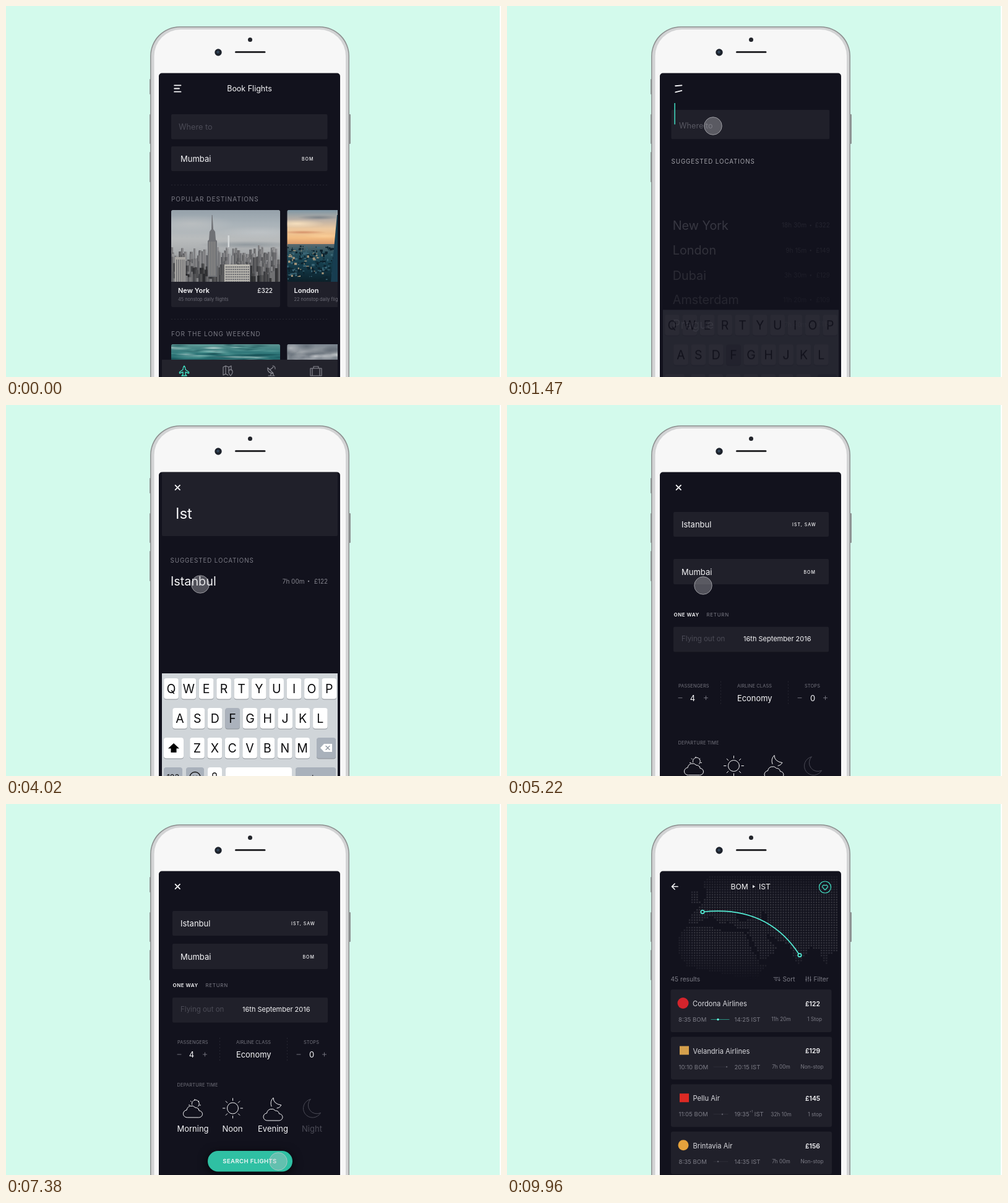
Write an HTML page with a canvas that moves like this. It is 800 by 600 pixels and loops after 9.99 s.

```html
<!DOCTYPE html>
<html lang="en">
<head>
<meta charset="utf-8">
<title>Flight booking</title>
<style>
html, body { margin: 0; width: 100%; height: 100%; overflow: hidden; background: #d3faec; }
canvas { display: block; width: 100%; height: 100%; }
</style>
</head>
<body>
<canvas id="stage" width="800" height="600"></canvas>
<script>
let ctx = document.getElementById('stage').getContext('2d');
const layer = document.createElement('canvas');
layer.width = 800;
layer.height = 600;
const layerCtx = layer.getContext('2d');

const LOOP = 9990;
const BG = '#12121d', FIELD = '#20202a', TEAL = '#42e0c4', WHITE = '#f6f6f8', GREY = '#7c7c86', DIM = '#4b4b56';
let t = 0;

const seg = (a, b) => Math.min(1, Math.max(0, (t - a) / (b - a)));
const inOut = p => p < .5 ? 4 * p ** 3 : 1 - (2 - 2 * p) ** 3 / 2;
const out = p => 1 - (1 - p) ** 3;
const mix = (a, b, p) => a + (b - a) * p;

function fade(alpha, draw, dx = 0, dy = 0) {
  if (alpha <= 0) return;
  ctx.save();
  ctx.globalAlpha *= alpha;
  ctx.translate(dx, dy);
  draw();
  ctx.restore();
}

// Fades overlapping shapes as one picture
function fadeGroup(alpha, draw, dy) {
  if (alpha <= 0) return;
  const main = ctx;
  ctx = layerCtx;
  ctx.clearRect(0, 0, 800, 600);
  draw();
  ctx = main;
  fade(alpha, () => ctx.drawImage(layer, 0, 0), 0, dy);
}

function text(s, x, y, size, color = WHITE, { weight = 400, gap = 0, align = 'left' } = {}) {
  ctx.font = `${weight} ${size}px Inter, sans-serif`;
  ctx.letterSpacing = gap + 'px';
  ctx.textAlign = align;
  ctx.fillStyle = color;
  ctx.fillText(s, x, y + size * .36);
}

function box(x, y, x2, y2, color, r = 2) {
  ctx.fillStyle = color;
  ctx.beginPath();
  ctx.roundRect(x, y, x2 - x, y2 - y, r);
  ctx.fill();
}

function disc(x, y, r, color) {
  ctx.fillStyle = color;
  ctx.beginPath();
  ctx.arc(x, y, r, 0, 7);
  ctx.fill();
}

function stroke(path, color, width = 1, x = 0, y = 0) {
  ctx.save();
  ctx.translate(x, y);
  ctx.strokeStyle = color;
  ctx.lineWidth = width;
  ctx.lineCap = ctx.lineJoin = 'round';
  ctx.stroke(new Path2D(path));
  ctx.restore();
}

function dashes(x1, y1, x2, y2) {
  ctx.save();
  ctx.setLineDash([2, 3]);
  ctx.strokeStyle = '#272731';
  ctx.beginPath();
  ctx.moveTo(x1, y1);
  ctx.lineTo(x2, y2);
  ctx.stroke();
  ctx.restore();
}

function gradient(x, y, x2, y2, colors) {
  const g = ctx.createLinearGradient(0, y, 0, y2);
  colors.forEach((c, i) => g.addColorStop(i / (colors.length - 1), c));
  box(x, y, x2, y2, g);
}

// Soft elliptical blob; rgb is "r,g,b"
function glow(x, y, rx, ry, rgb, alpha) {
  ctx.save();
  ctx.translate(x, y);
  ctx.scale(rx, ry);
  const g = ctx.createRadialGradient(0, 0, 0, 0, 0, 1);
  g.addColorStop(0, `rgba(${rgb},${alpha})`);
  g.addColorStop(1, `rgba(${rgb},0)`);
  disc(0, 0, 1, g);
  ctx.restore();
}

function random(seed) {
  return () => (seed = (seed * 16807) % 2147483647) / 2147483647;
}

function clipped(x, y, x2, y2, draw, r = 2) {
  ctx.save();
  ctx.beginPath();
  ctx.roundRect(x, y, x2 - x, y2 - y, r);
  ctx.clip();
  draw();
  ctx.restore();
}

function phone() {
  box(0, 0, 800, 600, '#fff', 0);
  box(0, 0, 798, 600, '#d3faec', 0);
  [[232, 118, 143], [232, 175, 223], [232, 236, 285], [553, 175, 223]]
    .forEach(([x, y, y2]) => box(x, y, x + 4, y2, '#8e9594', 1));
  box(233, 33, 555, 720, '#8d9090', 48);
  box(234.5, 34.5, 553.5, 720, '#d2d3d4', 47);
  box(239.5, 38, 549, 720, '#f7f7f7', 43);
  disc(394.5, 54.5, 3.5, '#23252b');
  disc(343, 75, 5.7, '#1d222b');
  disc(342.5, 74.5, 2.2, '#33475c');
  box(370, 73, 419.5, 76, '#2a2a2d', 1.5);
  box(247, 108.5, 540, 720, BG, 5);
}

function skyline() {
  gradient(267, 330, 443, 446, ['#95a1aa', '#aab3b9', '#b9bcbd', '#a8abad', '#85878a', '#57585b']);
  glow(300, 352, 70, 14, '205,203,200', .45);
  glow(410, 366, 70, 10, '200,204,207', .5);
  glow(390, 386, 80, 6, '118,130,139', .55);
  const rnd = random(11);
  for (let i = 0; i < 260; i++) {
    const depth = i / 260;
    const x = 264 + rnd() * 180, y = 386 + depth * 48 + rnd() * 8, w = 2.5 + depth * 5 * rnd() + rnd() * 2;
    const v = Math.round(142 - depth * 62 + (rnd() - .5) * (40 + depth * 70));
    box(x, y, x + w, 446, `rgb(${v},${v},${v + 2})`, 0);
    box(x, y, x + w * .4, 446, 'rgba(25,28,34,.3)', 0);
  }
  box(358.5, 371, 361, 390, '#d5d9da', 0);
  ctx.fillStyle = '#6f7175';
  ctx.fill(new Path2D('M332.6 338L333.6 338L335 361L338 365L339 378L341 380V438H326V380L328 378L329 365L332 361Z'));
  for (let x = 328; x < 340; x += 3) box(x, 381, x + 1, 436, '#96948f', 0);
  box(353, 418, 394, 446, '#b9b7b0', 0);
  for (let y = 421; y < 446; y += 4)
    for (let x = 355; x < 392; x += 3) box(x, y, x + 1.8, y + 2.2, '#636469', 0);
  box(273, 406, 290, 446, '#aaa8a4', 0);
  for (let x = 275; x < 290; x += 3) box(x, 410, x + 1.2, 446, '#626368', 0);
}

function sunset() {
  gradient(454, 330, 546, 390, ['#7f97a5', '#b7aea6', '#ecc9a0', '#f3bd83', '#cf8c62']);
  glow(470, 352, 45, 7, '255,232,196', .8);
  glow(505, 342, 34, 4, '96,108,120', .6);
  glow(480, 366, 38, 3, '196,112,78', .6);
  glow(515, 372, 36, 4, '255,214,160', .6);
  gradient(454, 385, 546, 446, ['#5b6b70', '#27505d', '#17404f', '#10303d', '#0c2029']);
  const rnd = random(29);
  for (let i = 0; i < 210; i++) {
    const x = 452 + rnd() * 84, y = 387 + rnd() * 57, tone = rnd();
    box(x, y, x + 1 + rnd() * 4, y + 1 + rnd() * 3, tone > .86 ? '#a9987c' : tone > .5 ? '#3b6676' : '#0d222d', 0);
  }
  ctx.fillStyle = '#173d50';
  ctx.fill(new Path2D('M535 338L540 338V446H525Z'));
}

function sea() {
  gradient(267, 547, 443, 575, ['#5c9492', '#30787a', '#1f6266']);
  const rnd = random(5);
  for (let i = 0; i < 70; i++) {
    const tone = rnd();
    glow(267 + rnd() * 176, 548 + rnd() * 26, 8 + rnd() * 22, 1 + rnd() * 2.5,
      tone > .75 ? '205,228,224' : tone > .4 ? '95,165,160' : '12,66,72', .55);
  }
}

function clouds() {
  gradient(454, 547, 546, 575, ['#7b858f', '#9ca2a7', '#878f97']);
  const rnd = random(17);
  for (let i = 0; i < 26; i++)
    glow(454 + rnd() * 84, 550 + rnd() * 25, 10 + rnd() * 14, 4 + rnd() * 7, rnd() > .45 ? '222,224,226' : '84,94,105', .6);
}

function destination(x, photo, city, count, price) {
  box(x, 330, x + 176, 487, FIELD, 3);
  clipped(x, 330, x + 176, 446, photo);
  text(city, x + 11, 460.5, 11, WHITE, { weight: 600 });
  text(count + ' nonstop daily flights', x + 11, 474.5, 7.4, '#6c6c76');
  if (price) text(price, x + 164, 460.5, 10, WHITE, { weight: 500, align: 'right' });
}

function home() {
  const lift = -10 * seg(900, 1100);
  fade(1 - seg(900, 1150), () => text('Book Flights', 393.5, 133.5, 12.5, WHITE, { align: 'center' }), 0, lift);
  fade(1 - seg(950, 1350), () => {
    box(267, 227, 519.5, 267, FIELD);
    text('Mumbai', 282, 247, 13);
    text('BOM', 478, 247.5, 7, WHITE, { gap: 1, weight: 500 });
    dashes(267, 289.5, 520, 289.5);
    text('POPULAR DESTINATIONS', 267, 312.5, 10, GREY, { gap: .95 });
    destination(267, skyline, 'New York', 45, '£322');
    destination(454.5, sunset, 'London', 22);
    dashes(267, 506.5, 520, 506.5);
    text('FOR THE LONG WEEKEND', 267, 530, 10, GREY, { gap: .95 });
    clipped(267, 547, 443, 662, sea);
    clipped(454.5, 547, 546, 662, clouds);
  });
  fade(1 - seg(1050, 1350), tabs, 0, 20 * seg(1050, 1350));
}

function tabs() {
  const icon = (path, x) => stroke(path, '#8d8d96', 1.1, x, 590);
  box(252, 572, 536, 610, '#23232c', 0);
  stroke('M0 -8q2 2 2 6l5.5 4v2l-5.5 -2v4l2 2h-8l2 -2v-4l-5.5 2v-2l5.5 -4q0 -4 2 -6z', TEAL, 1.4, 288, 590);
  icon('M-7 -6l4 -2l5 2l4 -2v7M-7 -6v13l4 -2l4 2M-3 -8v13M2 -6v6M5 8q-4 -5 -3 -7a3 3 0 0 1 6 0q1 2 -3 7z', 358);
  icon('M-6 -5q-1 9 9 9zM-2 -2l5 -4M2 -8q4 0 4 5M0 4l-2 4h6l-2 -4M-5 8h10', 429);
  icon('M-9 -4h18v12h-18zM-4 -4v-3h8v3M-6 -4v12M6 -4v12', 501);
}

function navIcon(e) {
  const line = (y, half, angle) => {
    ctx.save();
    ctx.translate(277.3, mix(y, 133.5, e));
    ctx.rotate(angle * e);
    stroke(`M${-half} 0H${half}`, WHITE, 1.8);
    ctx.restore();
  };
  line(128.3, 5.2, -Math.PI / 4);
  line(138.7, 5.2, -Math.PI * 3 / 4);
  fade(1 - seg(1200, 1420), () => stroke('M272.2 133.5H280', WHITE, 1.8));
}

function searchField(e) {
  const back = inOut(seg(4400, 5000));
  const side = (a, b, c) => mix(mix(a, b, e), c, back);
  box(side(267, 252, 269), side(175, 108.5, 173), side(519.5, 536, 520), side(215.5, 212, 213), FIELD);
  fade(1 - e, () => text('Where to', mix(279, 270, e), mix(195.5, 175, e), 12.7, mix(0, 1, e) > .05 ? '#5f5f69' : DIM));
  const letters = 'Ist';
  const size = mix(24, 13, back), x = mix(274, 282, back), y = mix(175, 193, back);
  let width = 0;
  [...letters].forEach((c, i) => {
    const start = 2775 + i * 345;
    fade(seg(start, start + 130), () => text(c, x + width, y, size));
    ctx.font = `400 ${size}px Inter, sans-serif`;
    ctx.letterSpacing = '0px';
    if (t > start + 70) width += ctx.measureText(c).width;
  });
  fade(seg(4250, 4420), () => text('anbul', x + width, y, size));
  fade(seg(4900, 5100), () => text('IST, SAW', 461, 193.5, 7, WHITE, { gap: 1, weight: 500 }));
  const cursorOn = t > 1250 && t < 4250 && t % 1000 >= 400;
  const cursorX = 270.3 + e + (width && width + 3);
  if (cursorOn) box(cursorX, 157, cursorX + 1.5, 191.5, TEAL, 0);
}

const CITIES = [['New York', '18h 30m', '£322'], ['London', '9h 15m', '£149'], ['Dubai', '3h 30m', '£129'],
  ['Amsterdam', '11h 20m', '£109'], ['Prague', '7h 40m', '£115']];

function city([name, time, price], y) {
  text(name, 266, y, 19.8);
  text(price, 520, y, 9.8, '#85858e', { align: 'right' });
  disc(489, y, 1.2, '#85858e');
  text(time, 482.5, y, 10, '#85858e', { align: 'right' });
}

function suggestions(e) {
  const gone = 1 - seg(4300, 4600);
  fade(seg(1150, 1430) * gone, () => text('SUGGESTED LOCATIONS', 265.5, 251.5, 9.8, e < .5 ? '#a3a3aa' : GREY, { gap: .9 }));
  CITIES.forEach((row, i) => {
    const p = inOut(seg(1210 + i * 16, 1960 + i * 16));
    fade(p * (1 - seg(3080 + i * 25, 3250 + i * 25)), () => city(row, 285 + i * 38), 2 * (1 - p), 84 * (1 - p));
  });
  fade(seg(3250, 3500) * gone, () => city(['Istanbul', '7h 00m', '£122'], 285));
}

const KEY = 28.36;
const ROWS = [['QWERTYUIOP', 267, 442], ['ASDFGHJKL', 281, 490], ['ZXCVBNM', 309, 538]];
const PRESSED = { I: [2700, 2900], S: [3060, 3200], T: [3400, 3540] };

function key(x, y, x2, color) {
  box(x, y + 1, x2, y + 34.5, '#8b9096', 4);
  box(x, y, x2, y + 33.5, color, 4);
}

function keyboard() {
  box(252, 434, 536, 640, '#d0d5d9', 0);
  for (const [letters, start, y] of ROWS) {
    [...letters].forEach((c, i) => {
      const x = start + i * KEY, press = PRESSED[c];
      const down = press && t > press[0] && t < press[1];
      key(x - 11.8, y, x + 11.8, down ? '#d3f2ec' : c === 'F' ? '#abb2bc' : '#fff');
      text(c, x, y + 17, 19.5, '#0b0b0d', { align: 'center' });
    });
  }
  key(255, 538, 287, '#fff');
  ctx.fillStyle = '#000';
  ctx.fill(new Path2D('M271 547l9 8.5h-4.5v6.5h-9v-6.5h-4.5z'));
  key(502, 538, 533, '#a9b1bb');
  ctx.fillStyle = '#fff';
  ctx.fill(new Path2D('M508 554.5l6 -6.5h13v13h-13z'));
  stroke('M517 551.5l6 6M523 551.5l-6 6', '#8d959f', 1.3);
  [[255, 285, '#a9b1bb'], [291, 320, '#a9b1bb'], [326, 349, '#fff'], [355, 462, '#fff'], [468, 533, '#a9b1bb']]
    .forEach(([x, x2, color]) => key(x, 586, x2, color));
  const label = (s, x) => text(s, x, 602, 12.5, '#111', { align: 'center' });
  label('123', 270);
  label('space', 408);
  label('return', 500);
  stroke('M297 602a8.5 8.5 0 1 1 17 0M303 600v0M308 600v0M334 604v-6a3 3 0 0 1 6 0v6', '#111', 1.3);
}

const CLOUD = 'M-9 14a6 6 0 0 1 -1 -12a8 8 0 0 1 14 -4a6 6 0 0 1 6 5a5.5 5.5 0 0 1 0 11z';
const MOON = 'M-3 -14.5a15 15 0 1 0 16.5 22a14 14 0 0 1 -16.5 -22z';

function rays(count, r1, r2, from = 0) {
  let d = '';
  for (let i = 0; i < count; i++) {
    const a = from + i * Math.PI / 4, c = Math.cos(a), s = Math.sin(a);
    d += `M${c * r1} ${s * r1}L${c * r2} ${s * r2}`;
  }
  return d;
}

function form() {
  const rest = (1 - out(seg(4650, 5800))) * 179.3;
  const row = (n, draw) => fade(out(seg(4650, 5250)), draw, 0, rest * n);
  row(1, () => {
    box(269, 226, 520, 267, FIELD);
    text('Mumbai', 282, 247, 13);
    text('BOM', 479.5, 247.5, 7, WHITE, { gap: 1, weight: 500 });
  });
  row(2, () => {
    text('ONE WAY', 269.5, 293.5, 8, WHITE, { weight: 600, gap: .5 });
    text('RETURN', 322.5, 293.5, 8, GREY, { gap: .7 });
    box(269, 313, 520, 353.5, FIELD);
    text('Flying out on', 282, 332, 11.5, DIM);
    text('16th September 2016', 382, 332.5, 11);
  });
  row(3, () => {
    const small = (s, x) => text(s, x, 385.5, 7.4, '#74747e', { gap: .15 });
    small('PASSENGERS', 277);
    small('AIRLINE CLASS', 372);
    small('STOPS', 481);
    text('4', 300, 405.5, 13, WHITE, { align: 'center' });
    text('Economy', 372, 405.5, 12.9);
    text('0', 494, 405.5, 13, WHITE, { align: 'center' });
    stroke('M277 405h6M318.5 405h6M321.5 402v6M470 405h6M511.5 405h6M514.5 402v6', GREY, .9);
    dashes(345.5, 378, 345.5, 418);
    dashes(454.5, 378, 454.5, 418);
  });
  row(4, () => {
    text('DEPARTURE TIME', 276.5, 454.5, 7.4, '#74747e', { gap: .2 });
    stroke(CLOUD, WHITE, 1, 302, 493);
    stroke('M-4.5 -1a6 6 0 1 1 10 3' + rays(6, 8, 9.5, -Math.PI), WHITE, 1, 305, 487);
    stroke('M9 0a9 9 0 1 1 -18 0a9 9 0 1 1 18 0' + rays(8, 12.5, 16), WHITE, 1, 366.5, 492);
    stroke(CLOUD, WHITE, 1, 431.5, 498);
    stroke('M-4 -2q-3 -8 3 -14q0 10 13 12q-3 5 -7 5', WHITE, 1, 433, 491);
    stroke(MOON, DIM, 1, 495, 492);
    ['Morning', 'Noon', 'Evening', 'Night'].forEach((s, i) =>
      text(s, [302, 366, 431.5, 494.5][i], 525.5, 13, i < 3 ? WHITE : DIM, { align: 'center' }));
  });
  row(5, () => {
    ctx.save();
    ctx.shadowColor = 'rgba(0,0,0,.75)';
    ctx.shadowBlur = 16;
    ctx.shadowOffsetY = 3;
    box(326, 561, 463, 594.5, t > 7250 && t < 7450 ? '#2fc0a3' : '#3adcbb', 17);
    ctx.restore();
    text('SEARCH FLIGHTS', 394, 577.5, 9.5, WHITE, { weight: 600, gap: .4, align: 'center' });
  });
}

function loader() {
  const bob = 1.5 * Math.sin((t - 8460) / 200);
  fade(seg(7850, 8100) * (1 - seg(8700, 8900)), () => {
    stroke('M380 362.5h21l6 -1l1.5 -5h2v6q-1 7 -6 7h-20q-5 0 -4.5 -7zM381 366.5h21M386 361l3 -6.5h8l2.5 5', TEAL, 1.8);
    ctx.save();
    ctx.setLineDash([4, 3.5]);
    ctx.lineDashOffset = (8460 - t) / 25;
    stroke('M378.5 356.5V374', TEAL, 1.6);
    ctx.restore();
  }, 0, bob);
}

const LAND = new Path2D(`M536 112H330L318 128L322 150L312 165L296 178L294 194L308 194L322 184L334 182L348 196L356 190
  L372 200L395 200L388 206L400 228L412 254L432 240L438 232L424 222L418 208L440 222L456 226L462 244L470 262L478 250
  L490 232L504 236L512 256L520 262L518 244L536 236ZM298 140H310L312 162H298Z
  M288 198L320 196L345 204L384 208L396 236L410 258L420 262L400 285L290 262L276 240V218Z
  M370 180L392 176L396 186L374 190ZM412 174L420 176L422 196L414 194Z`);
const dots = [];
for (let y = 118; y < 282; y += 4.1)
  for (let x = 254; x < 536; x += 4.1)
    if (ctx.isPointInPath(LAND, x, y, 'evenodd')) dots.push([x, y]);

function map() {
  for (const [x, y] of dots) {
    const shade = Math.min(1, (y - 100) / 50, (285 - y) / 50) * Math.min(1, (x - 255) / 50);
    ctx.fillStyle = `rgba(60,60,70,${Math.max(0, shade) * .75})`;
    ctx.fillRect(x - 1.2, y - 1.2, 2.4, 2.4);
  }
}

function route(p) {
  ctx.save();
  ctx.setLineDash([190 * p, 400]);
  stroke('M316 174.5Q421 163 473 244.5', '#52ead2', 1.7);
  ctx.restore();
  const end = (x, y) => {
    disc(x, y, 3.6, '#52ead2');
    disc(x, y, 1.8, BG);
  };
  end(316, 174.5);
  if (p > .95) end(473, 244.5);
}

const FLIGHTS = [
  ['Cordona Airlines', '£122', '8:35', '14:25', '11h 20m', '1 Stop', '#d3242c', 'disc'],
  ['Velandria Airlines', '£129', '10:10', '20:15', '7h 00m', 'Non-stop', '#d5a04c', 'square'],
  ['Pellu Air', '£145', '11:05', '19:35', '32h 10m', '1 stop', '#dd2a24', 'square'],
  ['Brintavia Air', '£156', '8:35', '14:35', '7h 00m', 'Non-stop', '#e5a23c', 'disc']];

function flight([name, price, leave, arrive, duration, stops, color, mark], i) {
  const y = 300 + i * 76.6, x = i ? 265 : 264.5;
  const rise = out(seg(8800 + i * 70, 9250 + i * 70));
  fade(rise, () => {
    box(x, y, x + 260, y + 69, FIELD, 3);
    if (mark === 'disc') disc(x + 20, y + 22, i ? 8.5 : 9, color);
    else box(x + 14, y + 15, x + 29, y + 29, color, 0);
    text(name, x + 35.5, y + 23, 11.2, '#d9d9de');
    text(price, 482, y + 23, 10.4, WHITE, { weight: 600 });
    text(leave + ' BOM', x + 12.5, y + 48.5, 9.6, GREY);
    text(arrive + (i === 2 ? '   IST' : ' IST'), 367.5, y + 48.5, 9.6, GREY);
    if (i === 2) text('+1', 392, y + 44, 5, GREY);
    text(duration, 443, y + 48.5, 8.3, GREY, { align: 'center' });
    text(stops, i % 2 ? 511.5 : 509, y + 48.5, 8.3, GREY, { align: 'right' });
    const glide = out(seg(9200, 9960));
    if (i) {
      stroke('M334 0H357', '#2d2d38', 1, 0, y + 48.5);
      disc(334 + (28 - 7 * i) * glide, y + 48.5, 1.2, '#5b5b66');
    } else {
      stroke('M330 0H359', '#2b8d80', 1.2, 0, y + 48.5);
      disc(330 + 11 * glide, y + 48.5, 1.7, '#66f5de');
    }
  }, 0, 70 * (1 - rise));
}

function results() {
  fade(seg(8800, 9150), () => {
    map();
    stroke('M276 133.5H266.5M271 129l-4.5 4.5l4.5 4.5', WHITE, 1.7);
    text('BOM', 361.5, 133.5, 12.2);
    ctx.fill(new Path2D('M397 131l4 2.5l-4 2.5z'));
    text('IST', 407, 133.5, 12.2);
    stroke('M9.5 0a9.5 9.5 0 1 1 -19 0a9.5 9.5 0 1 1 19 0M0 4.5l-4 -4a2.6 2.6 0 0 1 4 -3.2a2.6 2.6 0 0 1 4 3.2z', TEAL, 1.2, 514, 134.5);
    text('45 results', 264.5, 283, 10.2, GREY);
    stroke('M431 280.5h7M432.5 283h4.5M434 285.5h2M440 280v6M438.5 284.5l1.5 1.5l1.5 -1.5', GREY, .9);
    text('Sort', 445.5, 283, 10.2, GREY);
    stroke('M483.5 279v8M487 279v8M490.5 279v8M482.5 284h2M486 281.5h2M489.5 284.5h2', GREY, .9);
    text('Filter', 495.5, 283.5, 10.2, GREY);
    route(inOut(seg(8900, 9650)));
  });
  FLIGHTS.forEach(flight);
}

// Touch path: time, x, y
const TOUCH = [[0, 470, 620], [1000, 333, 194], [2000, 333, 194], [2700, 466, 456], [2830, 466, 456],
  [3070, 309, 507], [3170, 309, 507], [3410, 380, 459], [3500, 380, 459], [3950, 314, 290], [5220, 317, 292],
  [5400, 317, 292], [6200, 432, 499], [6450, 432, 499], [7000, 440, 578], [7450, 440, 578], [8400, 452, 578], [9100, 452, 578]];

function touch() {
  const i = Math.max(1, TOUCH.findIndex(k => k[0] > t));
  const [t1, x1, y1] = TOUCH[i - 1], [t2, x2, y2] = TOUCH[i];
  const p = inOut(seg(t1, t2));
  fade(1 - seg(8650, 8900), () => {
    disc(mix(x1, x2, p), mix(y1, y2, p), 14.3, 'rgba(190,190,196,.36)');
    ctx.strokeStyle = 'rgba(205,205,210,.65)';
    ctx.lineWidth = 1;
    ctx.stroke();
  });
}

function draw() {
  phone();
  clipped(252, 108.5, 536, 600, () => {
    if (t < 7900) {
      const e = inOut(seg(1249, 1999));
      if (t < 1400) home();
      fade(1 - seg(7500, 7850), () => {
        searchField(e);
        navIcon(e);
        if (t > 4650) form();
      });
      if (t > 1100 && t < 4800) {
        suggestions(e);
        const leave = inOut(seg(4300, 4700));
        fadeGroup(e, keyboard, 64 * (1 - e) + 170 * leave);
      }
    }
    loader();
    if (t > 8800) results();
    if (t < 9000) touch();
  }, 0);
}

function frame(now) {
  t = now % LOOP;
  draw();
  requestAnimationFrame(frame);
}
requestAnimationFrame(frame);
</script>
</body>
</html>
```
